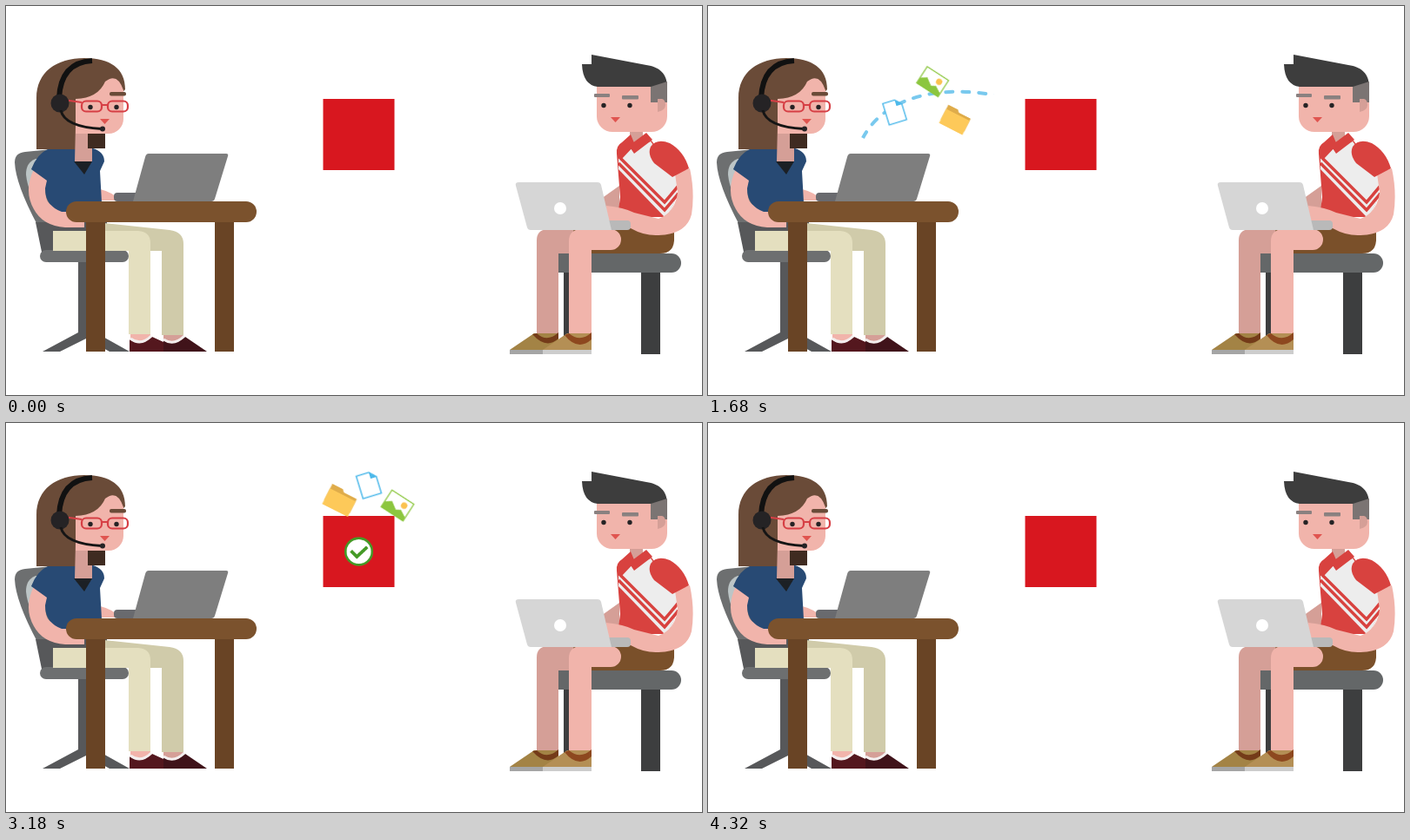
An HTML page that plays this animation: 800x448 px, repeating every 4.5 s.

```html
<!DOCTYPE html>
<html lang="en">
<head>
<meta charset="utf-8">
<title>File transfer</title>
<style>
html, body { margin: 0; width: 100%; height: 100%; overflow: hidden; background: #fff; }
svg { display: block; width: 100vw; height: 100vh; }

.skin { fill: #f1b4ab; }
.shade { fill: #d59f97; }
.ink { fill: #252325; }
.lips { fill: #e0544f; }
.red { fill: #d8423f; }

.icon, .badge, .trail { animation: 4500ms linear infinite; }
.doc { animation-name: doc; }
.photo { animation-name: photo; }
.folder { animation-name: folder; }
.badge { animation-name: badge; }
.trail { fill: none; stroke: #fff; stroke-width: 12; stroke-dasharray: 1 1.1; }
.out { animation-name: out; }
.in { animation-name: in; }
.dash { fill: none; stroke: #79c9ee; stroke-width: 4; stroke-dasharray: 8 11; stroke-linecap: round; }
.bob { animation: bob 900ms ease-in-out infinite; }

@keyframes bob {
  0%, 50%, 100% { transform: translateY(0); }
  25% { transform: translateY(-.8px); }
  75% { transform: translateY(.8px); }
}
@keyframes doc {
  0%, 4.5% { transform: translate(195px, 172px) scale(0); animation-timing-function: ease-out; }
  11.5% { transform: translate(161px, 130px) scale(1); }
  32% { transform: translate(161px, 130px) scale(1); animation-timing-function: ease-in; }
  40% { transform: translate(265px, 113px) scale(.9); }
  43.33% { transform: translate(326px, 123px) scale(.6); }
  46.7% { transform: translate(385px, 145px) scale(0); }
  46.71%, 62.5% { transform: translate(405px, 125px) scale(0); animation-timing-function: ease-out; }
  69% { transform: translate(417px, 71px) scale(1); }
  71% { transform: translate(417px, 71px) scale(1); animation-timing-function: ease-in; }
  76% { transform: translate(474px, 68px) scale(1); }
  81% { transform: translate(545px, 78px) scale(1); }
  85.33% { transform: translate(600px, 99px) scale(1); }
  88.5% { transform: translate(614px, 112px) scale(1); animation-timing-function: ease-in; }
  95.5%, 100% { transform: translate(640px, 184px) scale(0); }
}
@keyframes photo {
  0%, 6% { transform: translate(201px, 172px) scale(0); animation-timing-function: ease-out; }
  13% { transform: translate(201px, 95px) scale(1); }
  32% { transform: translate(201px, 95px) scale(1); animation-timing-function: ease-in; }
  40% { transform: translate(312px, 79px) scale(.95); }
  43.33% { transform: translate(364px, 94px) scale(.6); }
  46.2% { transform: translate(390px, 130px) scale(0); }
  46.21%, 61.8% { transform: translate(405px, 125px) scale(0); animation-timing-function: ease-out; }
  69% { transform: translate(450px, 95px) scale(1); }
  71% { transform: translate(450px, 95px) scale(1); animation-timing-function: ease-in; }
  76% { transform: translate(508px, 94px) scale(1); }
  81% { transform: translate(578px, 106px) scale(1); }
  85.33% { transform: translate(631px, 129px) scale(1); }
  88.5% { transform: translate(648px, 143px) scale(1); animation-timing-function: ease-in; }
  95%, 100% { transform: translate(645px, 184px) scale(0); }
}
@keyframes folder {
  0%, 7.5% { transform: translate(208px, 172px) scale(0); animation-timing-function: ease-out; }
  14.5% { transform: translate(223px, 147px) scale(1); }
  31% { transform: translate(223px, 147px) scale(1); animation-timing-function: ease-in; }
  40% { transform: translate(332px, 118px) scale(.85); }
  43% { transform: translate(388px, 142px) scale(0); }
  43.01%, 63% { transform: translate(402px, 125px) scale(0); animation-timing-function: ease-out; }
  67% { transform: translate(371px, 92px) scale(1); }
  70% { transform: translate(384px, 89px) scale(1); }
  71% { transform: translate(384px, 89px) scale(1); animation-timing-function: ease-in; }
  76% { transform: translate(444px, 87px) scale(1); }
  81% { transform: translate(512px, 99px) scale(1); }
  85.33% { transform: translate(564px, 121px) scale(1); }
  88.5% { transform: translate(579px, 135px) scale(1); animation-timing-function: ease-in; }
  95.8%, 100% { transform: translate(635px, 184px) scale(0); }
}
@keyframes badge {
  0%, 54.5% { transform: translate(405.5px, 148px) scale(0); }
  58% { transform: translate(405.5px, 148px) scale(1.15); }
  60% { transform: translate(405.5px, 148px) scale(1); }
  64.7% { transform: translate(405.5px, 148px) scale(1.06); }
  70.67% { transform: translate(405.5px, 148px) scale(.75); }
  75.5%, 100% { transform: translate(405.5px, 148px) scale(0); }
}
@keyframes out {
  0%, 29% { stroke-dashoffset: 1.02; animation-timing-function: ease-in-out; }
  40%, 48% { stroke-dashoffset: 0; }
  58%, 100% { stroke-dashoffset: -1.02; }
}
@keyframes in {
  0%, 74.5% { stroke-dashoffset: 1.02; animation-timing-function: ease-in-out; }
  85%, 88% { stroke-dashoffset: 0; }
  95.8%, 100% { stroke-dashoffset: -1.02; }
}
</style>
</head>
<body>
<svg viewBox="0 0 800 448" preserveAspectRatio="none">
  <defs>
    <mask id="showOut" maskUnits="userSpaceOnUse" x="0" y="0" width="800" height="448">
      <path class="trail out" pathLength="1" d="M178 152C202 106 266 86 351 107"/>
    </mask>
    <mask id="showIn" maskUnits="userSpaceOnUse" x="0" y="0" width="800" height="448">
      <path class="trail in" pathLength="1" d="M461 111C535 95 590 102 630 152"/>
    </mask>
  </defs>

  <!-- office chair -->
  <g fill="#6d6f70">
    <path d="M22 168L52 165V283H42L36 252Q11 205 10 180Q10 169 22 168Z"/>
    <path fill="#bcc5c6" d="M34 176Q23 180 23 194Q24 206 30 218L36 226V176Z"/>
    <path fill="#57585a" d="M34 249H116V259H54V283H41ZM83 294H92V370L142 398H119L92 383L62 398H42L83 376Z"/>
    <rect x="39" y="281" width="102" height="14" rx="7"/>
  </g>

  <!-- woman: legs and shoes -->
  <path fill="#d0cbaa" d="M113 250L188 258Q204 260 204 274V379H179V282H113Z"/>
  <path fill="#e4dfbf" d="M54 259H152Q166 260 166 273V378H141V282H54Z"/>
  <path class="skin" d="M143 378H166V386H143Z"/>
  <path class="shade" d="M181 379H204V387H181Z"/>
  <path fill="#54171e" d="M142 398V384Q155 393 168 381L205 398Z"/>
  <path fill="#40131a" d="M181 398V384Q193 393 206 381L231 398Z"/>
  <path fill="none" stroke="#f3eeee" stroke-width="3" d="M143 383Q155 392 167 380M181 384Q193 392 205 380"/>

  <!-- woman: body -->
  <path class="skin" d="M32 188L48 200Q40 226 57 232L90 237V255H68Q42 253 32 234Q20 213 32 188Z"/>
  <path class="skin" d="M108 211Q122 214 131 224H108Z"/>
  <path fill="#284a74" d="M48 165Q56 161 66 164H100Q113 168 113 179L108 190L110 226V237H64Q45 230 45 210L47 201L29 188Q36 170 48 165Z"/>
  <path fill="#6a4b38" d="M35 165V106C35 76 58 60 90 60C120 60 137 72 137 96L130 104L80 112V165Z"/>
  <path fill="#3f2b21" d="M93 145H114V164H93Z"/>
  <path class="shade" d="M80 138H94V164H99V179H79Z"/>
  <path fill="#1c2025" d="M78 179H99L90 194Z"/>
  <path class="skin" d="M80 107Q106 106 114 87Q128 76 135 97V130A17 17 0 0 1 118 147H80Z"/>
  <rect x="119" y="99" width="19" height="4.5" rx="2" fill="#6a4b38"/>
  <circle class="ink" cx="97" cy="116.5" r="2.7"/>
  <circle class="ink" cx="127" cy="116.5" r="2.7"/>
  <path class="lips" d="M108 130H119L113.5 136Z"/>
  <g fill="none" stroke="#d63f45" stroke-width="2.2">
    <rect x="87" y="109.5" width="23" height="12" rx="5"/>
    <rect x="117" y="109.5" width="23" height="12" rx="5"/>
    <path d="M110 114H117M66 108L87 111"/>
  </g>
  <path fill="none" stroke="#111" stroke-width="6" d="M61 106Q63 65 99 63"/>
  <circle class="ink" cx="62" cy="112" r="10.5"/>
  <path fill="none" stroke="#151515" stroke-width="3" d="M63 120Q67 139 110 141.5"/>
  <circle class="ink" cx="111" cy="141.5" r="3"/>

  <!-- desk -->
  <path fill="#694425" d="M92 240H114V398H92ZM240 240H262V398H240Z"/>
  <rect x="124" y="215" width="40" height="10" rx="4" fill="#696a6e"/>
  <path fill="#7e7e7e" d="M164 170H253Q256 170 255 173L240 222Q239 225 236 225H146L160 174Q161 170 164 170Z"/>
  <rect x="69" y="225" width="219" height="24" rx="12" fill="#7b522d"/>

  <!-- stool -->
  <path fill="#3d3e3f" d="M641 300H648V398H641ZM730 300H752V401H730Z"/>
  <path fill="#646768" d="M635 285H765A11 11 0 0 1 765 307H635Z"/>

  <!-- man: legs and shoes -->
  <path fill="#7a502a" d="M635 285Q638 260 662 255H768V270Q767 285 752 285Z"/>
  <path class="shade" d="M610 380V270Q610 258 622 257H652V285H635V380Z"/>
  <path class="skin" d="M647 380V271Q647 258 660 257H695A12 12 0 0 1 695 281H673V380Z"/>
  <path fill="#a38345" d="M607 377L579 396H635V377Z"/>
  <path fill="#a5a5a5" d="M579 396H618V401H579Z"/>
  <path fill="#b48f55" d="M645 377L617 396H673V377Z"/>
  <path fill="#cdcdcd" d="M617 396H673V401H617Z"/>
  <path fill="#743b19" d="M605 378L610 377Q622 388 635 376V383Q621 396 605 378Z"/>
  <path fill="#8d481f" d="M642 379L647 377Q660 388 673 376V384Q657 398 642 379Z"/>

  <!-- man: body -->
  <path class="shade" d="M684 222L705 207V234H688ZM717 144H732V162H717Z"/>
  <path class="red" d="M702 170L742 155L771 195V214Q768 234 757 243H703L706 220Z"/>
  <path fill="#ededed" d="M704 170L741 156L771 196V214Q769 233 757 243L704 188Z"/>
  <path fill="none" stroke="#d8423f" stroke-width="3.5" d="M704 173L757 226L773 207M704 181L757 235L773 216"/>
  <path class="red" d="M702 170Q701 161 708 157L718 148L723 160L707 177ZM736 146L743 154L722 170L716 161Z"/>
  <path class="skin" d="M769 193L786 187Q792 215 788 240Q782 263 750 264Q734 265 718 256L690 247V230Q710 232 722 238L750 245Q769 238 772 215Z"/>
  <path class="red" d="M766 197L745 181Q737 171 741 162Q748 152 763 158Q779 167 785 187Z"/>

  <!-- man: head -->
  <path class="skin" d="M679 90H760V127A18 18 0 0 1 742 145H697A18 18 0 0 1 679 127Z"/>
  <path fill="#3d3d3d" d="M673 56L736 68C751 70 760 78 760 93H680Q663 91 662 67H673Z"/>
  <path fill="#7b7473" d="M741 93L760 87V111H741Z"/>
  <path class="shade" d="M749 107H754Q758 108 758 114T749 122Z"/>
  <rect x="676" y="101" width="18" height="4" rx="1" fill="#8a8180"/>
  <rect x="708" y="103" width="19" height="4.5" rx="1" fill="#8a8180"/>
  <circle class="ink" cx="687" cy="114.5" r="2.7"/>
  <circle class="ink" cx="717" cy="114.5" r="2.7"/>
  <path class="lips" d="M695 128H706L700.5 134Z"/>

  <!-- man: laptop -->
  <rect x="685" y="247" width="33" height="11" rx="4" fill="#b9b9b9"/>
  <path fill="#d6d6d6" d="M589 203H680Q683 203 684 206L696 258H603Q600 258 599 255L586 207Q585 203 589 203Z"/>
  <circle cx="637" cy="233" r="7" fill="#fff"/>

  <!-- storage -->
  <rect x="364.5" y="107" width="82" height="82" fill="#d8171f"/>

  <g mask="url(#showOut)"><path class="dash" d="M178 152C202 106 266 86 351 107"/></g>
  <g mask="url(#showIn)"><path class="dash" d="M461 111C535 95 590 102 630 152"/></g>

  <g class="icon folder"><g class="bob"><g transform="rotate(27)">
    <path fill="#dfac4a" d="M-16.5 -13H-3L0 -10H16.5V8H-16.5Z"/>
    <path fill="#fdc959" d="M-16.5 -7H16.5V13H-16.5Z"/>
  </g></g></g>
  <g class="icon doc"><g class="bob"><g transform="rotate(-17)">
    <path fill="#fff" stroke="#4db9ea" stroke-width="1.5" d="M-11 -13.5H4L11 -6.5V13.5H-11Z"/>
    <path fill="#4db9ea" d="M4 -14L11.5 -6H4Z"/>
  </g></g></g>
  <g class="icon photo"><g class="bob"><g transform="rotate(33)">
    <rect x="-15" y="-11.5" width="30" height="23" fill="#fff" stroke="#8cc63f" stroke-width="1.3"/>
    <path fill="#8cc63f" d="M-15 11.5V4L-8 -1L1 5L6 2L15 7V11.5Z"/>
    <circle cx="6.5" cy="-4" r="3.7" fill="#fbc250"/>
  </g></g></g>

  <g class="badge">
    <circle r="20.5" fill="#fff" stroke="#449a26" stroke-width="3.5"/>
    <path fill="none" stroke="#449a26" stroke-width="5" d="M-12 -1L-3 8L13 -7"/>
  </g>
</svg>
</body>
</html>
```
